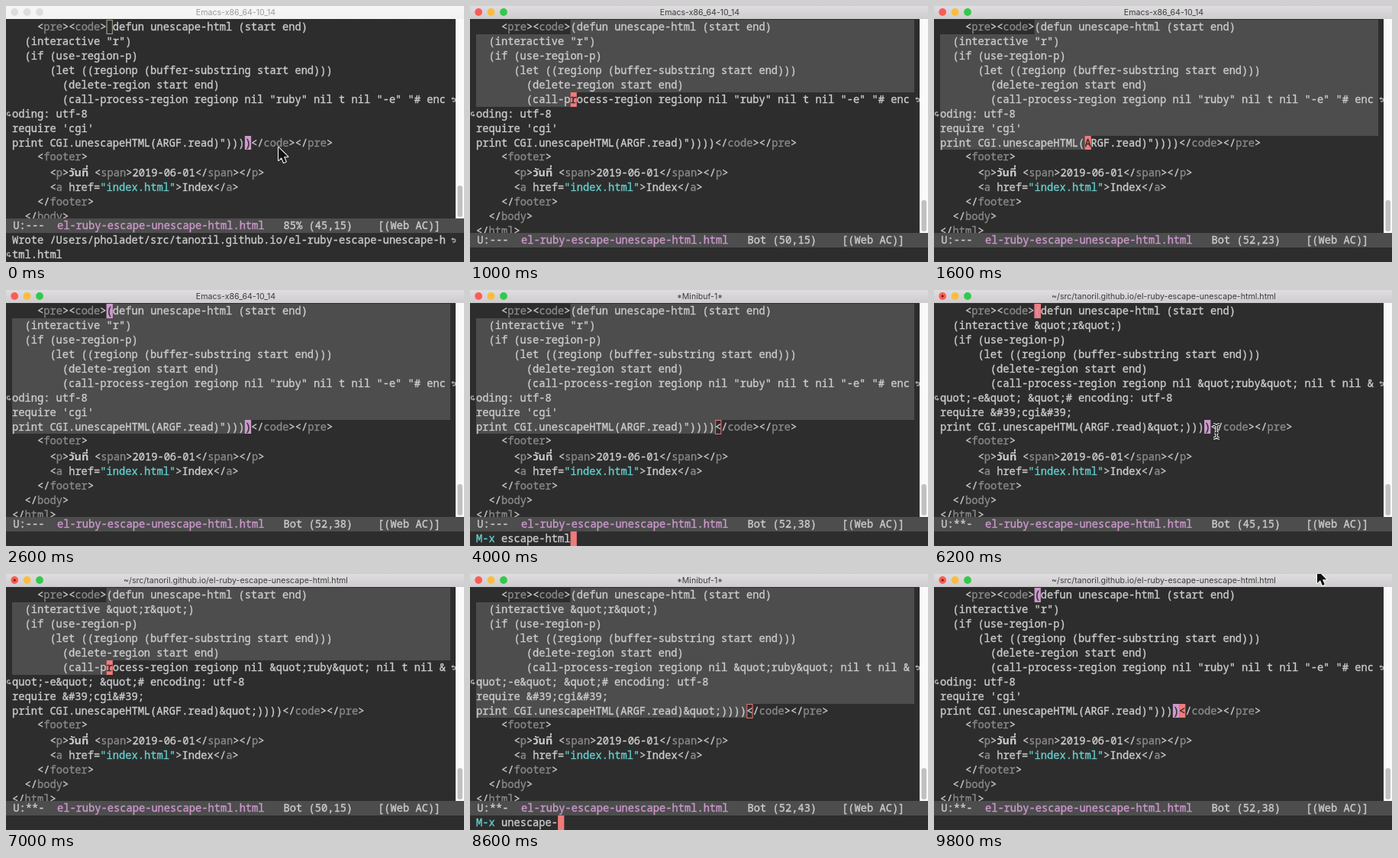
Animation of 600x335 px, one loop 10000 ms. Source, as an HTML page with a canvas:

```html
<!DOCTYPE html>
<html lang="en">
<head>
<meta charset="utf-8">
<title>Escaping HTML in an editor</title>
<style>
html, body { margin: 0; width: 100%; height: 100%; overflow: hidden; background: #2d2d2d; }
canvas { display: block; width: 600px; height: 335px; }
</style>
</head>
<body>
<canvas id="stage"></canvas>
<script>
const W = 600, H = 335, LOOP = 10000;
const CW = 8.24, RH = 18.94, LEFT = 8, TOP = 18, RIGHT = 582, COLS = 69;
const THAI_ROW = 10, THAI_EXTRA = 1.4;
const MONO = '"Noto Sans Mono", "DejaVu Sans Mono", monospace';
const C = {
  bg: '#2d2d2d', fg: '#cccccc', region: '#4d4d4d', tag: '#8b8989', bracket: '#cdc9c9',
  aqua: '#66cccc', purple: '#cc99cc', red: '#ee7b7a', fringe: '#a8a8a8'
};
const FILE = 'el-ruby-escape-unescape-html.html';
const SITE = 'tanoril.github.io/';
const APP = 'Emacs-x86_64-10_14', PATH = '~/src/' + SITE + FILE, MINI = '*Minibuf-1*';
const SAVED = 'Wrote /Users/pholadet/src/' + SITE + FILE;

const CODE = [
  '    <pre><code>(defun unescape-html (start end)',
  '  (interactive "r")',
  '  (if (use-region-p)',
  '      (let ((regionp (buffer-substring start end)))',
  '        (delete-region start end)',
  '        (call-process-region regionp nil "ruby" nil t nil "-e" "# encoding: utf-8',
  "require 'cgi'",
  'print CGI.unescapeHTML(ARGF.read)"))))</code></pre>'
];
const TAIL = [
  '    <footer>', '      <p>', '      <a href="index.html">Index</a>',
  '    </footer>', '  </body>', '</html>'
];
const THAI = 'วันที่';

const wrap = s => s.length > COLS ? [s.slice(0, COLS), s.slice(COLS)] : [s];
const quote = s => s.replace(/"/g, '&quot;').replace(/'/g, '&#39;');
const plainRows = [...CODE.flatMap(wrap), ...TAIL];
const escapedRows = [...CODE.map(quote).flatMap(wrap), ...TAIL];

const canvas = document.getElementById('stage');
const ctx = canvas.getContext('2d');
const dpr = window.devicePixelRatio || 1;
canvas.width = W * dpr;
canvas.height = H * dpr;

ctx.font = '100px ' + MONO;
const monoFont = 100 * CW / ctx.measureText('0').width + 'px ' + MONO;
const thaiFont = '600 14.5px "Noto Sans Thai", "Noto Sans", sans-serif';

// Each entry changes some fields of the state from its time on.
const open = [0, 15];
const steps = [
  [0, { active: false, title: APP, echo: SAVED, pos: open, region: false, on: true, mini: null,
        match: [open, [8, 37]], escaped: false, flags: '---', ptr: ['arrow', 357, 185] }],
  [200, { active: true }],
  [400, { echo: 'Mark set', ptr: null, region: true }],
  [600, { echo: '', pos: [2, 15], match: [] }],
  [800, { pos: [4, 15] }],
  [1000, { pos: [5, 15] }],
  [1200, { pos: [8, 15] }],
  [1400, { pos: [8, 17] }],
  [1600, { pos: [8, 23] }],
  [1800, { pos: [8, 29] }],
  [2000, { pos: [8, 34] }],
  [2200, { pos: [8, 37], match: [[2, 2], [8, 36]] }],
  [2400, { pos: [8, 38], match: [open, [8, 37]] }],
  [2600, { on: false }],
  [2800, { on: true, title: MINI, mini: '', match: [] }],
  [3000, { mini: 'e' }],
  [3200, { mini: 'esc' }],
  [3400, { mini: 'escap' }],
  [3600, { mini: 'escape-h' }],
  [3800, { mini: 'escape-htm' }],
  [4000, { mini: 'escape-html' }],
  [4200, { on: false }],
  [4400, { on: true, title: PATH, mini: null, region: false, escaped: true, flags: '**-',
           pos: [8, 43], match: [open, [8, 42]] }],
  [4600, { ptr: ['beam', 452, 120] }],
  [4800, { ptr: ['beam', 330, 82], on: false }],
  [5000, { ptr: ['beam', 215, 48] }],
  [5200, { ptr: ['beam', 150, 32], on: true }],
  [5400, { ptr: ['beam', 134, 28] }],
  [5600, { pos: open }],
  [5800, { ptr: ['beam', 210, 85] }],
  [6000, { ptr: ['beam', 330, 165] }],
  [6200, { ptr: ['beam', 370, 185] }],
  [6400, { echo: 'Mark set', region: true }],
  [6600, { echo: '', ptr: null, pos: [1, 15], match: [] }],
  [6800, { pos: [3, 15] }],
  [7000, { pos: [5, 15] }],
  [7200, { pos: [7, 15] }],
  [7400, { pos: [8, 15] }],
  [7600, { pos: [8, 27] }],
  [7800, { pos: [8, 39] }],
  [8000, { pos: [8, 43], match: [open, [8, 42]] }],
  [8200, { title: MINI, mini: '', match: [] }],
  [8400, { mini: 'unesc' }],
  [8600, { mini: 'unescape-' }],
  [8800, { mini: 'unescape-h' }],
  [9000, { mini: 'unescape-ht' }],
  [9200, { mini: 'unescape-html' }],
  [9800, { title: PATH, mini: null, region: false, escaped: false,
           pos: [8, 38], match: [open, [8, 37]], ptr: ['arrow', 502, -5] }]
];

const stateAt = t => Object.assign({}, ...steps.filter(s => s[0] <= t).map(s => s[1]));
const colX = c => LEFT + c * CW;
// The row with Thai script is a little taller than the others.
const rowY = r => Math.round(TOP + r * RH + (r >= THAI_ROW ? THAI_EXTRA : 0));

function rect(x, y, w, h, color) {
  ctx.fillStyle = color;
  ctx.fillRect(x, y, w, h);
}

// A hairline stroke gives the glyphs their slightly heavier weight.
function text(s, x, top, color) {
  ctx.font = monoFont;
  ctx.textAlign = 'left';
  ctx.fillStyle = ctx.strokeStyle = color;
  ctx.lineWidth = 0.35;
  ctx.fillText(s, x, top + 14);
  ctx.strokeText(s, x, top + 14);
}

function circle(x, y, r, color) {
  ctx.fillStyle = color;
  ctx.beginPath();
  ctx.arc(x, y, r, 0, Math.PI * 2);
  ctx.fill();
}

// Draws text with HTML tags coloured, keeping to the character grid.
function markup(s, x, top) {
  const put = (part, at, color) => text(part, x + at * CW, top, color);
  let at = 0;
  for (const m of s.matchAll(/(<\/?)([a-z]+)( href=)?("[^"]*")?(>)/g)) {
    put(s.slice(at, m.index), at, C.fg);
    at = m.index;
    [C.bracket, C.tag, C.bracket, C.aqua, C.bracket].forEach((color, i) => {
      const part = m[i + 1] || '';
      put(part, at, color);
      at += part.length;
    });
  }
  put(s.slice(at), at, C.fg);
}

function thaiWord(x, base) {
  ctx.font = thaiFont;
  ctx.textAlign = 'left';
  ctx.fillStyle = C.fg;
  ctx.fillText(THAI, x, base);
}

// Hook arrow marking a wrapped line; dir is 1 on the left side, -1 on the right.
function hook(x, y, dir) {
  ctx.save();
  ctx.translate(x, y);
  ctx.scale(dir, dir);
  ctx.strokeStyle = ctx.fillStyle = C.fringe;
  ctx.lineWidth = 1.5;
  ctx.stroke(new Path2D('M1-2.5H-1Q-2.5-2.5-2.5-0.5T-1 1.5H1'));
  ctx.fill(new Path2D('M0-0.8L3 1.5L0 3.6Z'));
  ctx.restore();
}

function titleBar(s) {
  const g = ctx.createLinearGradient(0, 0, 0, TOP);
  g.addColorStop(0, s.active ? '#dfdddf' : '#f6f6f6');
  g.addColorStop(1, s.active ? '#cdcbcd' : '#f2f2f2');
  rect(0, 0, W, 17, g);
  ['#fc5b57', '#fdbc40', '#34c84a'].forEach((color, i) =>
    circle(11.2 + i * 16.4, 8, 4.9, s.active ? color : '#dddddd'));
  if (s.title === PATH) circle(11.2, 8, 1.6, '#7a1512');
  ctx.font = '10.6px Inter, sans-serif';
  ctx.textAlign = 'center';
  ctx.fillStyle = s.active ? '#3c3c3c' : '#9c9c9c';
  ctx.fillText(s.title, 301, 12);
}

function scrollBar(bottom) {
  rect(589, 17, 11, bottom - 17, '#fafafa');
  ctx.fillStyle = '#c1c1c1';
  ctx.beginPath();
  ctx.roundRect(591.5, bottom - 43, 6.5, 41, 3.2);
  ctx.fill();
}

function region([endRow, endCol], rows) {
  for (let r = 0; r <= endRow; r++) {
    const x = r === 0 ? colX(open[1]) : LEFT;
    const end = r < endRow ? RIGHT : colX(endCol);
    rect(x, rowY(r), end - x, rowY(r + 1) - rowY(r), C.region);
  }
}

function cell([r, c], rows, color, ink = C.bg) {
  rect(colX(c), rowY(r), CW, rowY(r + 1) - rowY(r), color);
  text(rows[r][c] || ' ', colX(c), rowY(r), ink);
}

function hollow([r, c], color) {
  ctx.strokeStyle = color;
  ctx.lineWidth = 1;
  ctx.strokeRect(colX(c) + 0.5, rowY(r) + 0.5, CW - 1, RH - 1);
}

function modeLine(s, top, [r, c], scrolled) {
  rect(0, top, W, 19, C.region);
  const line = 45 + (r > 5 ? r - 1 : r);
  const col = r === 6 ? c + COLS : c;
  text('U:' + s.flags, CW + 1, top, C.fg);
  text(FILE, 8 * CW + 1, top, C.purple);
  text(`${scrolled ? 'Bot' : '85%'} (${line},${col})    [(Web AC)]`, 44 * CW + 1, top, C.fg);
}

function echoArea(s, top) {
  if (s.mini !== null) {
    text('M-x', LEFT, top, C.aqua);
    text(s.mini, colX(4), top, C.fg);
    if (s.on) rect(colX(4 + s.mini.length), top, CW, 19, C.red);
    return;
  }
  const lines = wrap(s.echo);
  lines.forEach((line, i) => text(line, LEFT, top + i * 19, C.fg));
  if (lines.length > 1) {
    hook(586, top + 9.5, -1);
    hook(4, top + 28.5, 1);
  }
}

function pointer([kind, x, y]) {
  ctx.save();
  ctx.translate(x, y);
  ctx.lineJoin = 'round';
  ctx.strokeStyle = '#ffffff';
  if (kind === 'arrow') {
    const p = new Path2D('M0 0V17L4 13.3L6.8 20L9.8 18.7L7 12.2H12.3Z');
    ctx.lineWidth = 2;
    ctx.stroke(p);
    ctx.fillStyle = '#111111';
    ctx.fill(p);
  } else {
    const p = new Path2D('M-4-9Q-1-9 0-7Q1-9 4-9M0-7V7M-4 9Q-1 9 0 7Q1 9 4 9M-2.5 2H2.5');
    ctx.lineWidth = 3.4;
    ctx.stroke(p);
    ctx.strokeStyle = '#111111';
    ctx.lineWidth = 1.3;
    ctx.stroke(p);
  }
  ctx.restore();
}

function cursor(s, rows, pos) {
  const matched = s.match.some(m => String(m) === String(pos));
  if (!s.active) {
    rect(colX(pos[1]), rowY(pos[0]), CW, RH, C.bg);
    hollow(pos, '#a9a58f');
  } else if (s.mini !== null) {
    hollow(pos, C.red);
  } else if (s.on) {
    cell(pos, rows, C.red, matched ? C.purple : C.bg);
  }
}

function buffer(s, rows, pos, bottom) {
  ctx.save();
  ctx.beginPath();
  ctx.rect(0, 17, W, bottom - 17);
  ctx.clip();
  if (s.region) region(pos, rows);
  rows.forEach((row, r) => markup(row, LEFT, rowY(r)));
  thaiWord(colX(9), rowY(THAI_ROW) + 14);
  markup(' <span>2019-06-01</span></p>', 107.8, rowY(THAI_ROW));
  hook(586, rowY(5) + 9.5, -1);
  hook(4, rowY(6) + 9.5, 1);
  s.match.forEach(m => cell(m, rows, C.purple));
  cursor(s, rows, pos);
  scrollBar(bottom);
  ctx.restore();
}

function draw(t) {
  const s = stateAt(t);
  const rows = s.escaped ? escapedRows : plainRows;
  const pos = [s.pos[0], Math.min(s.pos[1], rows[s.pos[0]].length)];
  const echoRows = wrap(s.echo).length;
  const modeTop = H - (echoRows + 1) * 19;
  ctx.setTransform(dpr, 0, 0, dpr, 0, 0);
  rect(0, 0, W, H, C.bg);
  buffer(s, rows, pos, modeTop);
  modeLine(s, modeTop, pos, echoRows === 1);
  echoArea(s, modeTop + 19);
  titleBar(s);
  if (s.ptr) pointer(s.ptr);
}

const start = performance.now();
function tick() {
  draw((performance.now() - start) % LOOP);
  requestAnimationFrame(tick);
}
tick();
</script>
</body>
</html>
```
